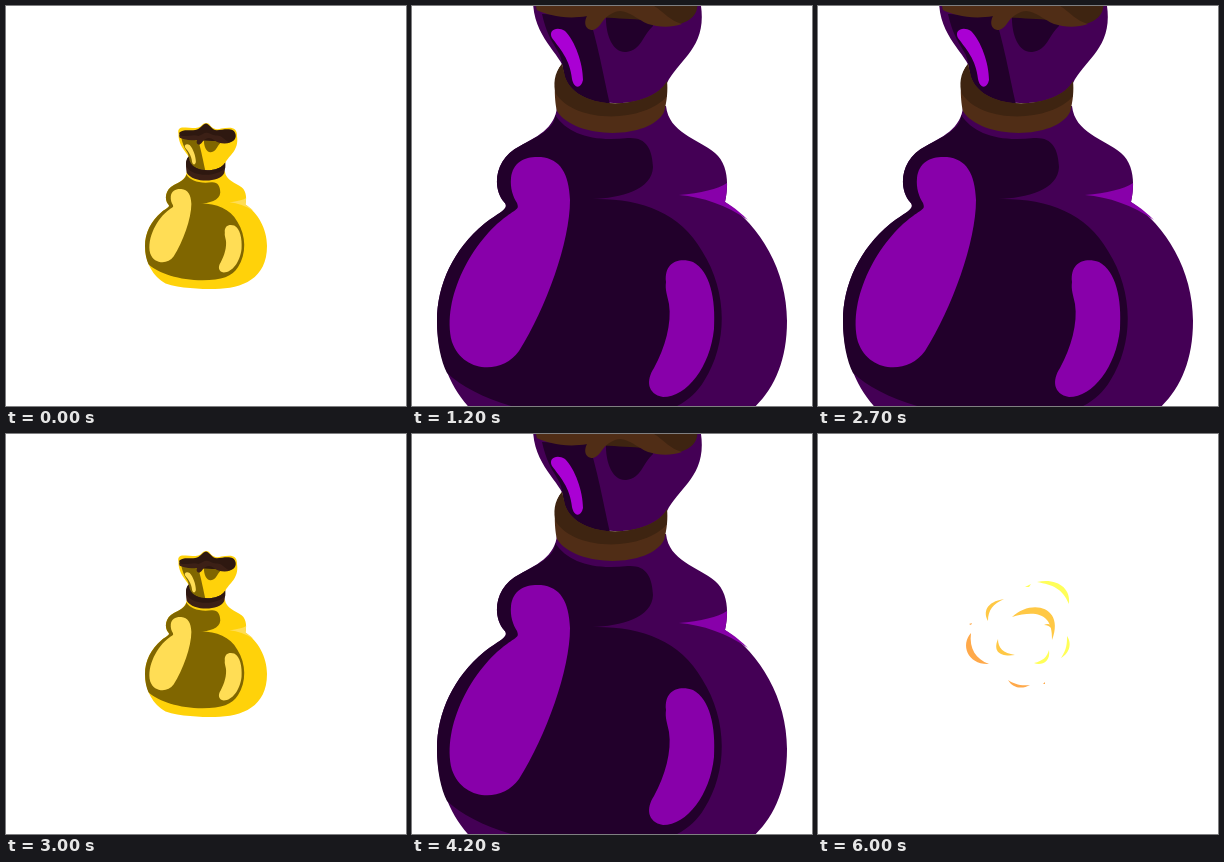
An HTML page for the animation above (6.3 s loop, 400 px wide and 400 px high).

```html
<!DOCTYPE html>
<html lang="en">
<head>
<meta charset="utf-8">
<title>Bursting bag</title>
<style>
html, body { margin: 0; width: 100%; height: 100%; overflow: hidden; background: #fff; }
svg { display: block; width: 100%; height: 100%; }
</style>
</head>
<body>
<svg id="stage" viewBox="0 0 400 400"></svg>
<script>
const STEP = 300, LOOP = 6300;
const stage = document.getElementById('stage');
const YELLOW = '#ffff59', AMBER = '#ffc845', ORANGE = '#ffa94a', RAY = '#ffe000';

const path = (fill, d) => `<path fill="${fill}" d="${d}"/>`;
const oval = (fill, x, y, rx, ry) => `<ellipse fill="${fill}" cx="${x}" cy="${y}" rx="${rx}" ry="${ry}"/>`;
const scaled = (s, art, cx = 200, cy = 200) =>
  `<g transform="translate(200 200) scale(${s}) translate(${-cx} ${-cy})">${art}</g>`;

// left contour shared by the body and its shaded side
const leftSide = 'C144 123 122 132 108 140C82 153 80 182 92 196C99 203 85 207 72 218C42 243 25 278 25 315';

function bag({ size, main, dark, light, shine = light, rim, inside }) {
  return scaled(size / 350, [
    // body
    path(main, `M145 100${leftSide}C25 360 48 404 84 422C126 436 182 438 226 438C305 438 375 408 375 315C375 264 348 220 313 196C317 178 316 158 303 147C285 132 257 127 254 100Z`),
    path(dark, `M143 109${leftSide}C25 337 29 355 35 367C62 393 125 413 190 413C245 413 276 402 292 375C316 337 316 286 290 245C268 206 228 192 180 193C209 192 240 184 241 161C240 142 234 131 216 132C180 136 156 128 143 109Z`),
    path(light, 'M267 189C289 187 306 183 315 177C315 186 314 191 313 196C322 201 331 209 336 214C314 199 291 191 267 189Z'),
    path(light, 'M99 172C101 155 114 150 129 151C148 153 157 167 158 194C158 236 134 302 107 345C90 369 51 367 40 336C29 292 61 234 95 210C106 202 107 203 105 197C101 191 98 182 99 172Z'),
    path(light, 'M254 276C252 257 266 251 281 256C298 265 304 293 302 323C298 361 275 391 251 391C235 388 234 374 242 362C253 342 260 317 257 298C255 288 253 284 254 276Z'),
    // neck
    path(main, 'M121 -8C118 -22 126 -27 142 -25C166 -22 182 -24 188 -32C196 -40 206 -40 212 -31C220 -20 232 -19 244 -22C270 -27 290 -28 289 0C295 42 266 54 255 77C247 102 165 108 153 70C154 50 120 34 121 -8Z'),
    path(dark, 'M130 8C134 26 139 34 145 44C153 56 149 65 154 75C164 96 187 100 198 98C193 78 187 42 177 10Z'),
    path(shine, 'M140 32C136 24 145 20 153 25C163 35 171 57 171 74C169 83 162 83 160 73C158 53 148 43 140 32Z'),
    path(dark, 'M194 8C193 31 202 47 214 46C230 44 230 30 241 20L238 4Z'),
    path(inside, 'M123 -10C136 -22 152 -15 169 -18C185 -21 188 -35 200 -37C212 -34 216 -19 231 -17C252 -20 282 -27 285 -5C287 6 281 14 268 18C240 12 154 12 125 4Z'),
    path(rim, 'M123 -4C143 5 163 -8 178 -1C192 -5 197 -15 211 -8C224 0 234 -4 242 0C252 6 258 15 270 18C258 22 246 21 236 18C222 12 212 -1 199 8C189 13 190 21 181 24C174 24 171 18 175 10C154 14 135 9 125 4Z'),
    // tie
    path(rim, 'M150 58C141 68 142 92 145 105C163 134 238 134 252 106C255 95 256 84 255 75C241 103 166 108 153 71Z'),
    path(inside, 'M150 58C142 67 141 79 144 88C165 119 234 116 255 90L255 75C241 103 166 108 153 71Z')
  ].join(''));
}

const rays = path(RAY, 'M74 173L128 193L155 155L152 133L159 150L200 168Q240 137 270 107Q252 137 235 170L273 207Q300 206 326 199Q256 224 265 240Q272 251 289 257Q265 251 246 252L262 290L214 263L178 278Q162 290 155 308L160 275L147 245Q130 260 112 272L131 244L120 208Z');

const drops = [[279, 98, 288, 90], [187, 137, 188, 122], [148, 118, 150, 123], [277, 175, 292, 169],
  [303, 261, 307, 263], [269, 300, 275, 304], [97, 288, 103, 282]]
  .map(([x, y, X, Y]) => path(RAY, `M${x} ${y}L${X - 2} ${Y - 1}Q${X + 2} ${Y - 1} ${X} ${Y + 3}Z`)).join('');

const cloud = [
  [ORANGE, 131, 226, 18, 20], [ORANGE, 184, 262, 31, 30], [ORANGE, 161, 239, 16, 17], [ORANGE, 233, 242, 19, 16],
  [YELLOW, 162, 182, 38, 36], [AMBER, 153, 187, 28, 34], [AMBER, 143, 217, 24, 20],
  [YELLOW, 250, 189, 26, 23], [AMBER, 252, 194, 25, 25], [AMBER, 235, 219, 22, 32],
  [YELLOW, 211, 181, 14, 17], [AMBER, 206, 187, 15, 17], [AMBER, 183, 219, 37, 30],
  [AMBER, 187, 250, 17, 25], [ORANGE, 202, 229, 28, 21],
  [YELLOW, 190, 202, 26, 23], [AMBER, 192, 211, 29, 27],
  [YELLOW, 221, 208, 14, 15], [AMBER, 208, 220, 24, 24], [AMBER, 217, 212, 13, 15]
].map(part => oval(...part)).join('');

const holes = [[185, 207, 34, 28], [226, 190, 22, 17], [157, 218, 20, 18], [193, 244, 19, 16], [157, 184, 19, 16]]
  .map(part => oval('#fff', ...part)).join('');

const wisps = [
  [YELLOW, 'M219 148C239 144 253 154 251 170C244 154 235 151 219 148Z'],
  [YELLOW, 'M207 153L213 150L211 153Z'],
  [AMBER, 'M194 183C214 164 247 173 234 206C235 179 218 176 194 183Z'],
  [AMBER, 'M226 191Q233 188 234 195Q231 191 226 191Z'],
  [AMBER, 'M186 165C168 168 165 178 170 187C170 176 175 170 186 165Z'],
  [ORANGE, 'M153 199C142 211 150 231 171 230C158 225 151 215 153 199Z'],
  [ORANGE, 'M151 190L154 189L153 191Z'],
  [AMBER, 'M180 205C174 219 184 223 197 221C185 219 180 214 180 205Z'],
  [ORANGE, 'M190 246C195 255 205 255 212 251C202 252 196 250 190 246Z'],
  [YELLOW, 'M231 216C233 229 222 232 216 229C225 227 229 223 231 216Z'],
  [YELLOW, 'M249 202C255 211 250 220 243 224C249 215 249 209 249 202Z'],
  [ORANGE, 'M225 250L227 248V250Z']
].map(part => path(...part)).join('');

const bags = [
  { size: 122, main: '#ffd20a', dark: '#806600', light: '#ffdd55', rim: '#3c2016', inside: '#2e1810' },
  { size: 174, main: '#ea6900', dark: '#803300', light: '#ff8440', rim: '#462717', inside: '#372012' },
  { size: 240, main: '#d40000', dark: '#800000', light: '#ff2a2a', rim: '#502d16', inside: '#402814' },
  { size: 278, main: '#8c002b', dark: '#510015', light: '#c4156a', rim: '#502d16', inside: '#402814' },
  { size: 350, main: '#440055', dark: '#22002b', light: '#8800aa', shine: '#aa00d4', rim: '#502d16', inside: '#3e2411' }
].map(bag);

const burst = [
  scaled(.62, rays + oval(YELLOW, 198, 205, 62, 55)),
  rays + drops + cloud,
  scaled(.78, rays) + scaled(1.06, cloud, 195, 219),
  scaled(.93, drops) + scaled(1.14, cloud + holes, 195, 219),
  scaled(1.58, wisps),
  wisps
];

const scenes = [...bags, ...bags, ...bags, ...burst];
const start = performance.now();
let shown = -1;

function draw(now) {
  const index = Math.floor((Math.max(0, now - start) % LOOP) / STEP);
  if (index !== shown) {
    stage.innerHTML = scenes[index];
    shown = index;
  }
  requestAnimationFrame(draw);
}
draw(start);
</script>
</body>
</html>
```
